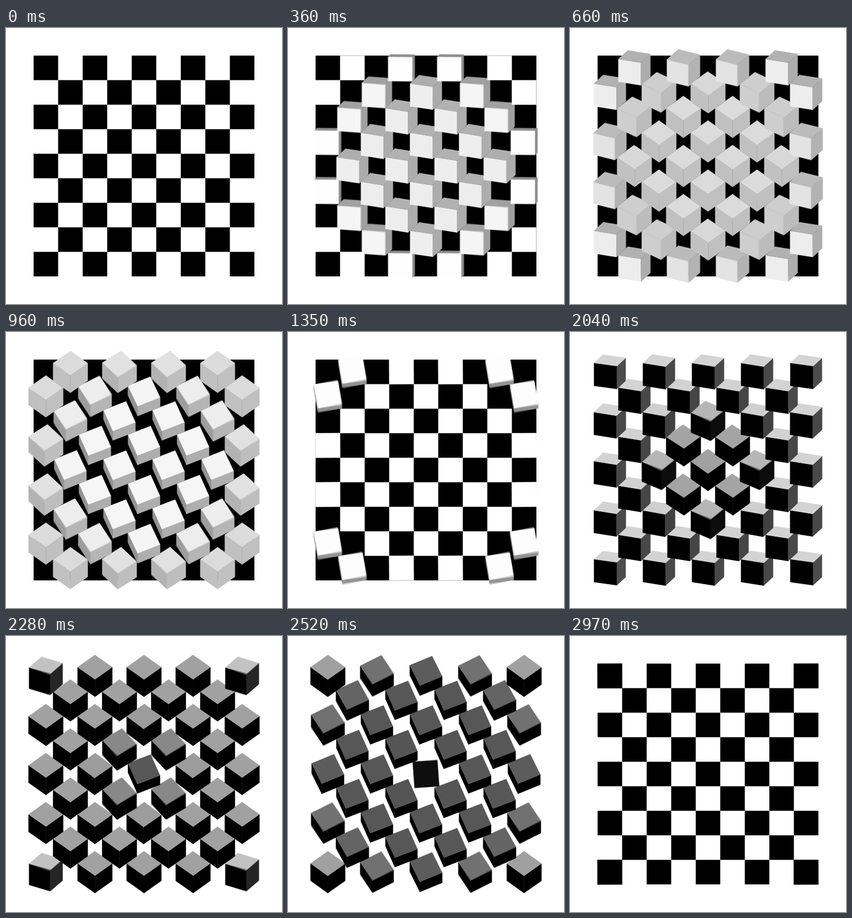
These frames come from a looping animation (500 px wide and 500 px high, 3 s). An HTML page with a canvas:

```html
<!DOCTYPE html>
<html lang="en">
<head>
<meta charset="utf-8">
<title>Turning checkerboard</title>
<style>
html, body { margin: 0; width: 100%; height: 100%; overflow: hidden; background: #fff; }
canvas { display: block; }
</style>
</head>
<body>
<canvas id="stage" width="500" height="500"></canvas>
<script>
const ctx = document.getElementById('stage').getContext('2d');

const LOOP = 3000, HALF = LOOP / 2, STEP = 30;
const COUNT = 9, SIDE = 400 / COUNT, R = SIDE / 2, MID = 4;
const STAGES = 4, STAGE_GAP = 300, STAGE_TIME = 200, MAX_DELAY = 400;
const SAMPLES = 5, SHUTTER = 0.6;

const clamp = (v, lo, hi) => Math.min(hi, Math.max(lo, v));
const ease = x => x < 0.5 ? 4 * x ** 3 : 1 - 4 * (1 - x) ** 3;

// Each face: outward normal and its two in-plane axes.
const FACES = [
  [[0, 0, 1], [1, 0, 0], [0, 1, 0]],
  [[1, 0, 0], [0, 0, 1], [0, 1, 0]],
  [[0, 1, 0], [1, 0, 0], [0, 0, 1]]
];
const CORNERS = [[-1, -1], [1, -1], [1, 1], [-1, 1]];

// Four quarter-steps of a 90 degree turn, rippling out from the centre.
function turnAt(ms, dist) {
  const t = ms - MAX_DELAY * dist / Math.hypot(MID, MID);
  let sum = 0;
  for (let k = 0; k < STAGES; k++) {
    sum += ease(clamp((t - k * STAGE_GAP) / STAGE_TIME, 0, 1));
  }
  return sum / STAGES * Math.PI / 2;
}

// Spin about the vertical axis, then tip towards the viewer (y is up).
function rotate([x, y, z], c, s) {
  const x1 = x * c - z * s, z1 = x * s + z * c;
  return [x1, y * c - z1 * s, y * s + z1 * c];
}

function shade([x, y, z], white) {
  const v = white ? 128 * (1 + z) : 255 * (x + 2 * y) / Math.sqrt(5);
  const g = Math.round(clamp(v, 0, 255));
  return `rgb(${g},${g},${g})`;
}

function drawCube(cx, cy, angle, white) {
  const still = angle < 1e-4 || angle > Math.PI / 2 - 1e-4;
  if (still) {
    ctx.fillStyle = white ? '#fff' : '#000';
    ctx.fillRect(cx - R, cy - R, SIDE, SIDE);
    return;
  }
  const c = Math.cos(angle), s = Math.sin(angle);
  for (const face of FACES) {
    const [n, u, v] = face.map(axis => rotate(axis, c, s));
    if (n[2] <= 0) continue;
    ctx.beginPath();
    for (const [a, b] of CORNERS) {
      ctx.lineTo(cx + R * (n[0] + a * u[0] + b * v[0]),
                 cy - R * (n[1] + a * u[1] + b * v[1]));
    }
    ctx.closePath();
    ctx.fillStyle = ctx.strokeStyle = shade(n, white);
    ctx.lineWidth = 0.4;
    ctx.fill();
    ctx.stroke();
  }
}

function drawScene(ms) {
  const white = ms < HALF;
  ctx.fillStyle = '#fff';
  ctx.fillRect(0, 0, 500, 500);
  if (white) {
    ctx.fillStyle = '#000';
    ctx.fillRect(50, 50, 400, 400);
  }
  for (let row = COUNT - 1; row >= 0; row--) {
    for (let col = 0; col < COUNT; col++) {
      if ((row + col) % 2 !== (white ? 1 : 0)) continue;
      const angle = turnAt(ms % HALF, Math.hypot(col - MID, row - MID));
      drawCube(50 + (col + 0.5) * SIDE, 50 + (row + 0.5) * SIDE, angle, white);
    }
  }
}

const buffer = document.createElement('canvas');
buffer.width = buffer.height = 500;
const screen = ctx;

// Averages a few moments within the step for a short motion blur.
function render(now) {
  const start = Math.floor((now % LOOP) / STEP) * STEP;
  for (let i = 0; i < SAMPLES; i++) {
    screen.globalAlpha = 1;
    drawInto(start + STEP * SHUTTER * i / (SAMPLES - 1));
    blend.globalAlpha = 1 / (i + 1);
    blend.drawImage(screen.canvas, 0, 0);
  }
  screen.drawImage(buffer, 0, 0);
}

const blend = buffer.getContext('2d');
const drawInto = drawScene;

const origin = performance.now();
function tick() {
  render(performance.now() - origin);
  requestAnimationFrame(tick);
}
tick();
</script>
</body>
</html>
```
